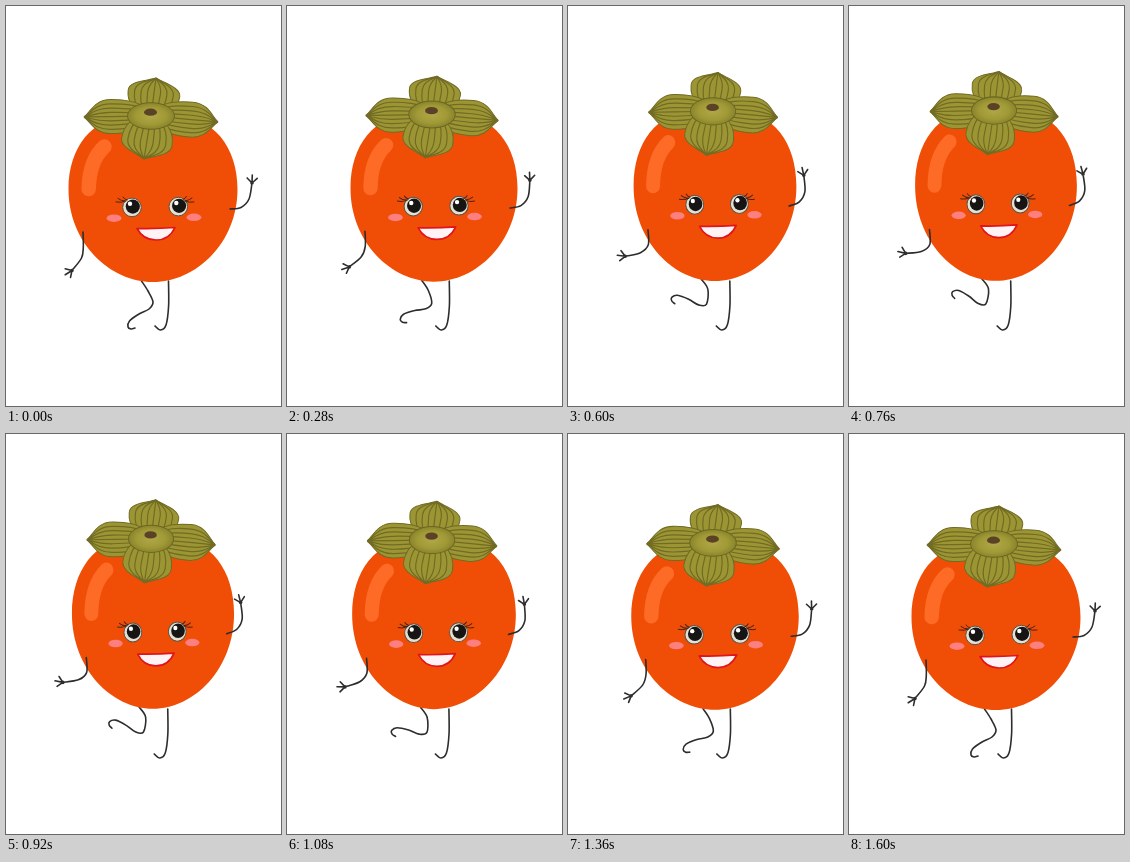
An HTML page for the animation above (1680 ms loop, 275 px wide and 400 px high).

```html
<!DOCTYPE html>
<html lang="en">
<head>
<meta charset="utf-8">
<title>Dancing persimmon</title>
<style>
html, body { margin: 0; width: 100%; height: 100%; overflow: hidden; background: #fff; }
svg { display: block; width: 100vw; height: 100vh; }
.limb { fill: none; stroke: #2d2d2d; stroke-width: 1.6; stroke-linecap: round; stroke-linejoin: round; }
.lash { fill: none; stroke: #4a2416; stroke-width: 1; stroke-linecap: round; }
</style>
</head>
<body>
<svg viewBox="0 0 275 400">
  <defs>
    <radialGradient id="cap">
      <stop offset="0" stop-color="#b0a848"/>
      <stop offset=".65" stop-color="#a09936"/>
      <stop offset="1" stop-color="#8a842c"/>
    </radialGradient>
    <g id="eye">
      <circle r="9.3" fill="#e4e1d4" stroke="#5d5147"/>
      <circle cx=".8" cy="-.8" r="7.1" fill="#171514"/>
      <circle cx="-2" cy="-3.6" r="2.2" fill="#fff"/>
    </g>
  </defs>
  <g id="legs"></g>
  <g id="fruit">
    <path fill="#f04e06" d="M147 112C200 100 231.5 135 231.5 183C231.5 237 190 276 147 276C104 276 62.5 237 62.5 183C62.5 135 94 100 147 112Z"/>
    <path fill="none" stroke="#fd6b27" stroke-width="14.5" stroke-linecap="round" d="M98.5 140.5C88 150 83 165 82.7 183"/>
    <g id="leaves" transform="translate(145 110)"></g>
    <ellipse cx="145" cy="110" rx="23.5" ry="13.3" fill="url(#cap)" stroke="#6c6722"/>
    <ellipse cx="144.5" cy="106.2" rx="6.5" ry="3.6" fill="#5b4226"/>
    <ellipse cx="108" cy="212.2" rx="7.4" ry="3.7" fill="#fd7f80"/>
    <ellipse cx="188" cy="211.3" rx="7.4" ry="3.7" fill="#fd7f80"/>
    <use href="#eye" x="126" y="201.4"/>
    <use href="#eye" x="172.3" y="200.6"/>
    <path class="lash" d="M120 195Q115 197 110 196M119 195Q115 195 112 192.5M121 194Q118 193 117 191M179 195Q183 197 188 196M179 195Q184 194 186 192M177 193.5Q180 192 180.5 190.5"/>
    <path d="M131 222.5Q150 223 169 221.5C165 230 158 234 150 234C142 234 135 230 131 222.5Z" fill="#fff3f5" stroke="#e0141c" stroke-width="1.7" stroke-linejoin="round"/>
  </g>
  <g id="arms"></g>
</svg>
<script>
const LOOP = 1680, SWING = 1600, STEP = 40, RAD = Math.PI / 180;
const el = id => document.getElementById(id);

// A leaf points from the cap's middle to (x, y); its veins are narrower copies of the edge.
function leaf(x, y, half) {
  const len = Math.hypot(x, y);
  const side = w => `M${len} 0C${.9 * len} ${.3 * w} ${.84 * len} ${w} ${.6 * len} ${w}S${.25 * len} ${.85 * w} ${.1 * len} ${.6 * w}`;
  let veins = '';
  for (let k = -3; k <= 3; k++) veins += side(half * k / 4);
  return `<g transform="rotate(${Math.atan2(y, x) / RAD})" stroke="#716b24">
    <path d="${side(half)}L${.1 * len} 0${side(-half)}L${.1 * len} 0" fill="#9c9534"/>
    <path d="${veins}" fill="none" stroke-width="1.2"/></g>`;
}
el('leaves').innerHTML =
  leaf(5, -38, 26) + leaf(-67, 1, 17) + leaf(67, 6, 17.5) + leaf(-7, 43, 25.5);

// The joints after the first `fixed` turn about `pivot`; the whole limb drifts by `shift`.
const limbs = [
  { parent: 'legs', fixed: 2, pivot: [140, 292], turn: 66, shift: [-2.5, -2],
    joints: [[135.5, 275], [142, 285], [147, 296], [143, 303], [133, 308], [123.5, 315], [122, 321], [125, 323], [129, 322]] },
  { parent: 'legs', fixed: 0, pivot: [162, 275], turn: 0, shift: [-.8, 0],
    joints: [[162.5, 275], [162.6, 300], [160, 319], [154.5, 324], [149, 320]] },
  { parent: 'arms', fixed: 2, pivot: [77, 242], turn: 46, shift: [3.5, -2.5], hand: 148,
    joints: [[77, 226], [77.3, 241], [75.5, 252], [66, 264.5]] },
  { parent: 'arms', fixed: 1, pivot: [224, 203], turn: -17, shift: [-3.5, -3.5], hand: -88,
    joints: [[224, 203], [235, 201.5], [243, 193], [246, 177]] }
];
for (const limb of limbs) {
  limb.path = document.createElementNS('http://www.w3.org/2000/svg', 'path');
  limb.path.setAttribute('class', 'limb');
  el(limb.parent).append(limb.path);
}

function rotate([x, y], [cx, cy], deg) {
  const c = Math.cos(deg * RAD), s = Math.sin(deg * RAD);
  return [cx + (x - cx) * c - (y - cy) * s, cy + (x - cx) * s + (y - cy) * c];
}

// Smooth curve through all points.
function spline(pts) {
  let d = `M${pts[0]}`;
  for (let i = 0; i < pts.length - 1; i++) {
    const a = pts[i], b = pts[i + 1], before = pts[i - 1] || a, after = pts[i + 2] || b;
    const c1 = a.map((v, j) => v + (b[j] - before[j]) / 6);
    const c2 = b.map((v, j) => v - (after[j] - a[j]) / 6);
    d += `C${c1} ${c2} ${b}`;
  }
  return d;
}

function hand([x, y], deg) {
  const fingers = [-46, 0, 46].map(d => {
    const tip = rotate([x + (d ? 7 : 8), y], [x, y], deg + d);
    return `M${x} ${y}L${tip}`;
  });
  return fingers.join('') + `M${x - 1} ${y}a1 1 0 1 0 2 0a1 1 0 1 0 -2 0`;
}

function pose({ joints, fixed, pivot, turn, shift, hand: aim, path }, p) {
  const pts = joints.map((pt, i) =>
    (i < fixed ? pt : rotate(pt, pivot, turn * p)).map((v, j) => v + shift[j] * p));
  const end = aim === undefined ? '' : hand(pts.at(-1), aim + turn * p);
  path.setAttribute('d', spline(pts) + end);
}

function draw(ms) {
  const t = Math.min(SWING, Math.floor(ms % LOOP / STEP) * STEP);
  const p = (1 - Math.cos(2 * Math.PI * t / SWING)) / 2;
  el('fruit').setAttribute('transform',
    `translate(147 ${276 - 1.2 * p}) scale(${1 - .043 * p} ${1 + .026 * p}) translate(-147 -276)`);
  limbs.forEach(limb => pose(limb, p));
}

let start;
function tick(now) {
  start ??= now;
  draw(now - start);
  requestAnimationFrame(tick);
}
draw(0);
requestAnimationFrame(tick);
</script>
</body>
</html>
```
